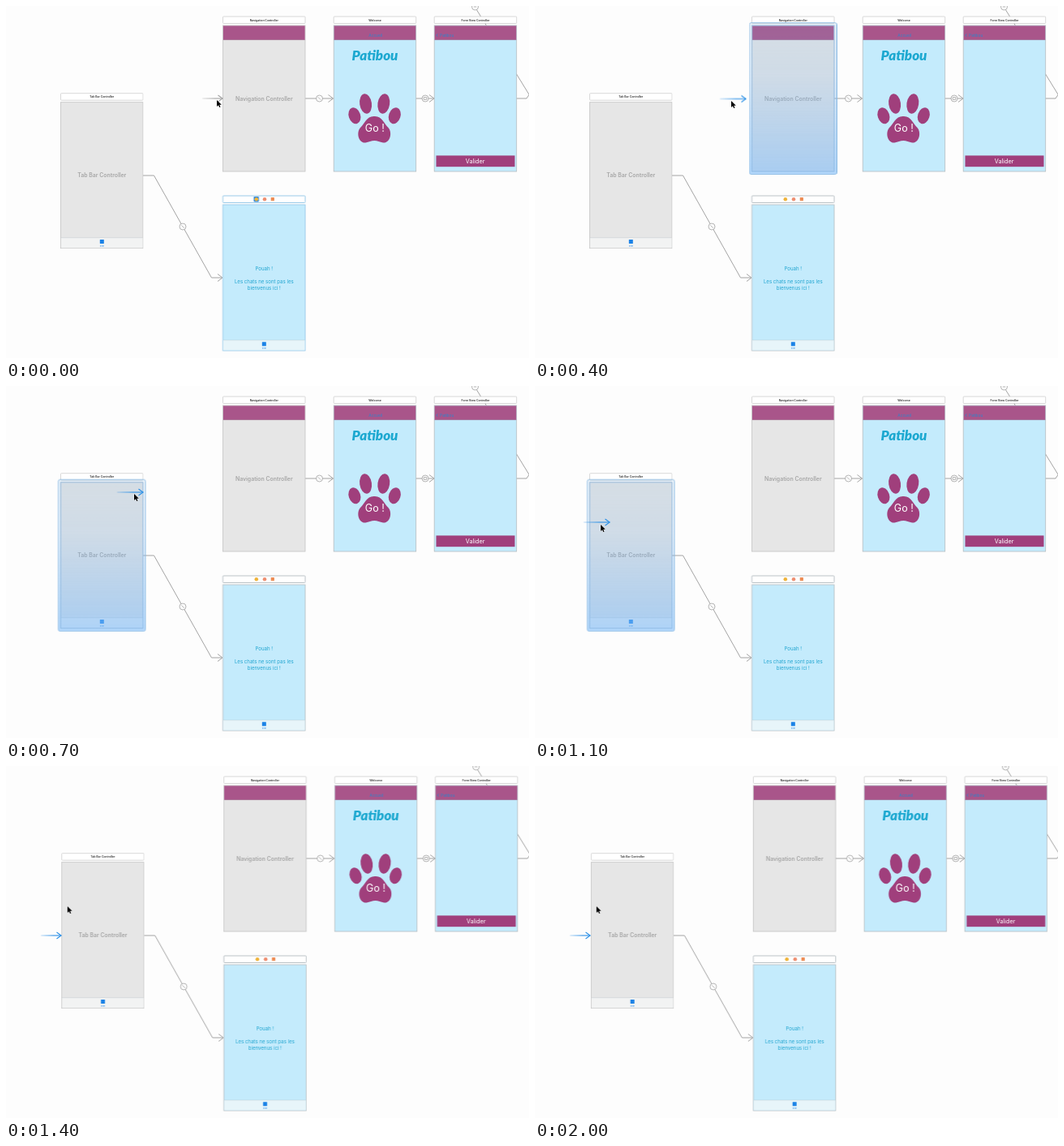
Animation of 645x434 px, one loop 2.1 s. Source, as an HTML page:

```html
<!DOCTYPE html>
<html lang="fr">
<head>
<meta charset="utf-8">
<title>Storyboard</title>
<style>
html, body { margin: 0; width: 100%; height: 100%; overflow: hidden; background: #fdfdfd; }
svg { display: block; width: 645px; height: 434px; }
text { font-family: Inter, "Liberation Sans", sans-serif; text-anchor: middle; }
.caption { font-size: 3.4px; font-weight: 700; fill: #444; }
.label { font-size: 6.9px; font-weight: 600; fill: #a6a6a6; }
.body { font-size: 6.1px; fill: #20a5d0; }
.bar { fill: #2b86cc; font-size: 4.8px; }
.item { fill: #2b8ae6; font-size: 2.6px; }
.logo { font: italic 900 17px Lato, sans-serif; fill: #1ca8d0; }
.wire { fill: none; stroke: #a3a3a3; stroke-width: 1; }
.knot { fill: #fdfdfd; stroke: #a3a3a3; stroke-width: .8; }
.plum { fill: #a03f7c; }

/* One loop has 21 equal steps. */
.drift, .cursor, .arrow, .tail, .lit, .picked, .focus {
  animation: 2100ms step-end infinite;
}
.drift { animation-name: drift; }
.cursor { animation-name: cursor; }
.arrow { animation-name: arrow; }
.tail { animation-name: tail; }
.lit { opacity: 0; }
.lit.nav { animation-name: lit-nav; }
.lit.tab { animation-name: lit-tab; }
.picked { animation-name: picked; }
.focus { animation-name: focus; }

@keyframes drift {
  0% { transform: none; }
  61.9% { transform: translateX(.8px); }
  66.66% { transform: translateX(1.2px); }
  76.19% { transform: translateX(1.5px); }
  85.71%, 100% { transform: translateX(1.8px); }
}
@keyframes cursor {
  0% { transform: translate(260px, 116px); }
  4.76% { transform: translate(259px, 116px); }
  9.52% { transform: translate(256px, 116px); }
  14.28% { transform: translate(252px, 116px); }
  19.04% { transform: translate(242px, 117px); }
  23.8% { transform: translate(222px, 119px); }
  28.57% { transform: translate(196px, 122px); }
  33.33% { transform: translate(158px, 133px); }
  38.09% { transform: translate(128px, 147px); }
  42.85% { transform: translate(106px, 158px); }
  47.61% { transform: translate(91px, 166px); }
  52.38% { transform: translate(81px, 171px); }
  57.14%, 100% { transform: translate(75.7px, 173px); }
}
@keyframes arrow {
  0% { transform: translate(267px, 114px); color: #a3a3a3; }
  4.76% { transform: translate(267px, 114px); color: #2a8fe6; }
  9.52% { transform: translate(269px, 114px); color: #2a8fe6; }
  14.28% { transform: translate(270px, 114px); color: #2a8fe6; }
  19.04% { transform: translate(260px, 114.5px); color: #2a8fe6; }
  23.8% { transform: translate(240px, 116px); color: #2a8fe6; }
  28.57% { transform: translate(214.5px, 118px); color: #2a8fe6; }
  33.33% { transform: translate(169px, 131px); color: #2a8fe6; }
  38.09% { transform: translate(139px, 145px); color: #2a8fe6; }
  42.85% { transform: translate(117px, 156px); color: #2a8fe6; }
  47.61% { transform: translate(102px, 164px); color: #2a8fe6; }
  52.38% { transform: translate(92px, 168px); color: #2a8fe6; }
  57.14% { transform: translate(87px, 170px); color: #2a8fe6; }
  66.66%, 100% { transform: translate(68px, 209px); color: #2a8fe6; }
}
@keyframes tail {
  0% { transform: scaleX(.78); }
  9.52% { transform: none; }
  66.66%, 100% { transform: scaleX(.78); }
}
@keyframes lit-nav { 0% { opacity: 0; } 19.04% { opacity: 1; } 33.33%, 100% { opacity: 0; } }
@keyframes lit-tab { 0% { opacity: 0; } 33.33% { opacity: 1; } 66.66%, 100% { opacity: 0; } }
@keyframes picked { 0% { opacity: 1; } 4.76%, 100% { opacity: 0; } }
@keyframes focus { 0% { stroke: #8fc4e6; } 19.04%, 100% { stroke: #b4bcc0; } }
</style>
</head>
<body>
<svg viewBox="0 0 645 434">
  <defs>
    <linearGradient id="glow" x2="0" y2="1">
      <stop offset="0" stop-color="#78b0e0" stop-opacity=".14"/>
      <stop offset=".35" stop-color="#78b4ee" stop-opacity=".2"/>
      <stop offset="1" stop-color="#78b9fa" stop-opacity=".56"/>
    </linearGradient>
    <!-- Scene parts, with the screen's top left corner at 0,0 -->
    <rect id="title" y="-11" width="101.5" height="8.5" rx=".8" fill="#fff" stroke="#cfcfcf" stroke-width=".8"/>
    <rect id="screen" width="101.5" height="180" stroke-width=".8"/>
    <g id="navbar">
      <rect x=".4" y=".4" width="100.7" height="17.2" fill="#a9558a"/>
      <path d="M.4 17.6H101.1" stroke="#8f4a77" stroke-width=".5"/>
    </g>
    <g id="tabbar">
      <path d="M.4 167H101.1V179.6H.4Z" fill="#f8f9fa" fill-opacity=".68"/>
      <path d="M.4 167H101.1" stroke="#b9c2c8" stroke-width=".4"/>
      <rect x="48.3" y="169.3" width="5" height="5" rx=".5" fill="#1b82e6"/>
      <text class="item" x="50.8" y="178.4">Item</text>
    </g>
    <g id="halo">
      <rect x="-3" y="-3.3" width="107.5" height="186.8" rx="2" fill="url(#glow)" stroke="#8dbbe4" stroke-width=".9"/>
      <rect width="101.5" height="180" fill="none" stroke="#8fc0ee" stroke-width=".7"/>
    </g>
    <path id="head" class="wire" d="M-6 -4.5L0 0L-6 4.5"/>
  </defs>

  <g class="drift">
    <g class="wire">
      <path d="M580 4L593 25"/>
      <path d="M629 83L645 109M629.5 114H642L646 108"/>
      <path d="M369 114H403.5M505.5 114H528"/>
      <path d="M169 209H182.5L253.5 335H267"/>
    </g>
    <use href="#head" x="403.5" y="114"/>
    <use href="#head" x="528" y="114"/>
    <use href="#head" x="267" y="335"/>
    <g class="knot">
      <circle cx="578.5" cy="1" r="4"/>
      <circle cx="386.5" cy="114" r="4"/>
      <circle cx="517" cy="114" r="4"/>
      <circle cx="218" cy="272" r="4"/>
      <path d="M384.8 112.3L388.2 115.7M216.3 270.3L219.7 273.7M576.8 1H580.2"/>
      <path d="M515.2 112.6H518.8V115.4H515.2Z"/>
    </g>

    <g transform="translate(267.5 24)">
      <use href="#title"/>
      <text class="caption" x="50.8" y="-5.4">Navigation Controller</text>
      <use href="#screen" fill="#e6e6e6" stroke="#c4c4c4"/>
      <use href="#navbar"/>
      <text class="label" x="50.8" y="92.8">Navigation Controller</text>
      <use href="#halo" class="lit nav"/>
    </g>

    <g transform="translate(404.2 24)">
      <use href="#title"/>
      <text class="caption" x="50.8" y="-5.4">Welcome</text>
      <use href="#screen" fill="#c4ebfc" stroke="#b4bcc0"/>
      <use href="#navbar"/>
      <text class="bar" x="51.5" y="13.7">Accueil</text>
      <text class="logo" x="50.8" y="42.5">Patibou</text>
    </g>
    <g class="plum">
      <ellipse cx="443.6" cy="120.5" rx="7.4" ry="12.3" transform="rotate(-8 443.6 120.5)"/>
      <ellipse cx="465.8" cy="120.5" rx="7.4" ry="12.3" transform="rotate(8 465.8 120.5)"/>
      <ellipse cx="429.9" cy="135.3" rx="7.2" ry="10.2" transform="rotate(-18 429.9 135.3)"/>
      <ellipse cx="479.3" cy="135.3" rx="7.2" ry="10.2" transform="rotate(18 479.3 135.3)"/>
      <path d="M454.3 136C464 135.5 466 145 471.5 150C477 156.5 473.5 169.5 465 168.5C461 167.5 458 166 454.3 166C450.500 166 447.500 167.500 443.500 168.500C435 169.500 431.500 156.500 437 150C442.500 145 444.500 135.500 454.300 136Z"/>
    </g>
    <text x="454.8" y="155" font-size="12.5" fill="#fff">Go !</text>

    <g transform="translate(528.2 24)">
      <use href="#title"/>
      <text class="caption" x="50.8" y="-5.4">Form View Controller</text>
      <use href="#screen" fill="#c4ebfc" stroke="#b4bcc0"/>
      <use href="#navbar"/>
      <path d="M4.200 10.300L2.600 12L4.200 13.700" fill="none" stroke="#2b86cc" stroke-width=".8"/>
      <text class="bar" x="15.500" y="13.700">Patibou</text>
      <rect class="plum" x="2.300" y="160.400" width="97" height="13.800"/>
      <text x="50.500" y="170" font-size="7.300" fill="#fff">Valider</text>
    </g>

    <g transform="translate(67.5 118.700)">
      <use href="#title"/>
      <text class="caption" x="50.8" y="-5.4">Tab Bar Controller</text>
      <use href="#screen" fill="#e6e6e6" stroke="#c4c4c4"/>
      <use href="#tabbar"/>
      <text class="label" x="50.8" y="92.8">Tab Bar Controller</text>
      <use href="#halo" class="lit tab"/>
    </g>

    <g transform="translate(267.5 245)">
      <g class="focus">
        <rect y="-11" width="101.5" height="8.5" rx=".8" fill="#fff" stroke-width=".9"/>
        <use href="#screen" fill="#c4ebfc"/>
      </g>
      <rect class="picked" x="38" y="-10" width="6.400" height="6.400" rx=".8" fill="#3289dc"/>
      <circle cx="41.300" cy="-6.800" r="2.300" fill="#efb43c"/>
      <circle cx="51.500" cy="-6.800" r="2.300" fill="#ee8f72"/>
      <rect x="59.200" y="-8.900" width="4.200" height="4.200" rx=".5" fill="#ed8d56"/>
      <g class="body">
        <text x="50.8" y="80.500">Pouah !</text>
        <text x="50.8" y="96.500">Les chats ne sont pas les</text>
        <text x="50.8" y="104.500">bienvenus ici !</text>
      </g>
      <use href="#tabbar"/>
    </g>
  </g>

  <g class="arrow">
    <linearGradient id="fade" gradientUnits="userSpaceOnUse" x1="-32" x2="-12">
      <stop offset="0" stop-color="currentColor" stop-opacity=".25"/>
      <stop offset="1" stop-color="currentColor"/>
    </linearGradient>
    <path class="tail" d="M-32 0H0" stroke="url(#fade)" stroke-width="1.100"/>
    <path d="M-5.500 -4L0 0L-5.500 4" fill="none" stroke="currentColor" stroke-width="1.100"/>
  </g>
  <path class="cursor" d="M0 0V8L1.900 6.300L3.200 9L4.500 8.400L3.200 5.800H5.800Z" fill="#000" stroke="#fff" stroke-width=".7" paint-order="stroke"/>
</svg>
</body>
</html>
```
